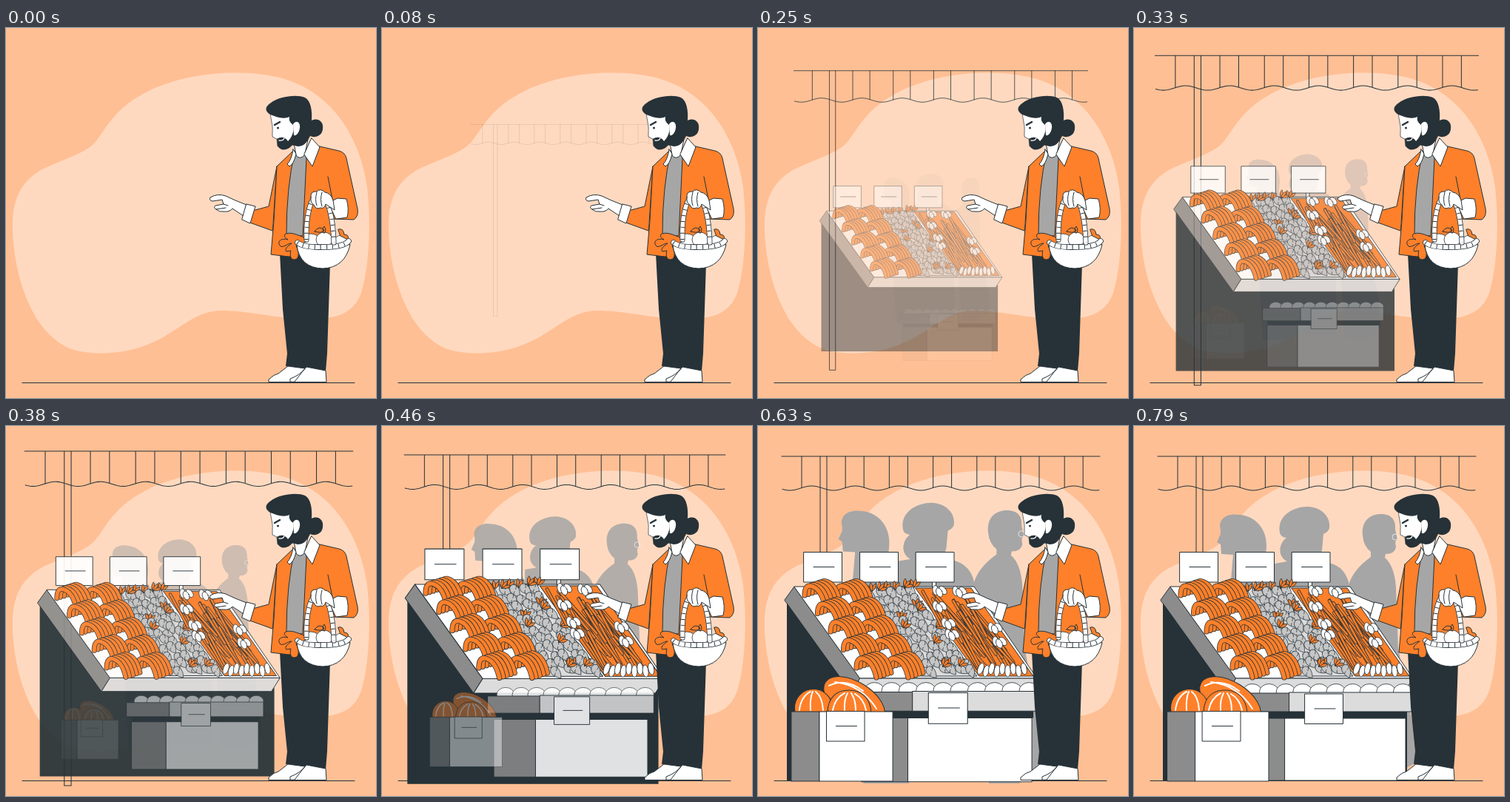
These frames come from a looping animation (500 px wide and 500 px high, 0.83 s). An HTML page:

```html
<!DOCTYPE html>
<html lang="en">
<head>
<meta charset="utf-8">
<title>Market stall</title>
<style>
html, body { margin: 0; width: 100%; height: 100%; overflow: hidden; background: #ffbf94; }
svg { display: block; width: 100vw; height: 100vh; }
.line { fill: none; stroke: #263238; }
.white { fill: #fff; stroke: #263238; }
.orange { fill: #ff802a; stroke: #263238; }
.pale { fill: #dcdcdc; stroke: #263238; }
.grey { fill: #8c8c8c; stroke: #263238; }
.dark { fill: #263238; }
.shade { fill: #a6a6a6; }
</style>
</head>
<body>
<svg viewBox="0 0 500 500" stroke-linejoin="round" stroke-linecap="round">
  <path fill="#ffd9bf" d="M9 270C8 235 18 205 55 188C85 175 108 168 120 155C136 136 145 108 195 84C250 58 330 54 380 70C440 90 478 145 488 215C494 270 490 325 480 358C468 392 435 394 400 393C355 391 325 381 288 382C255 383 235 408 200 424C165 441 120 443 92 435C30 415 9 320 9 270Z"/>
  <path class="line" d="M22 479.5H471"/>

  <g id="people" class="shade">
    <path d="M117 140C113 126 125 117 143 120C165 122 180 140 179 164L177 185L200 215L205 478H145L130 220L134 174L118 173L117 160L112 157L117 146Z"/>
    <path d="M197 144C193 122 214 109 235 109C255 110 266 124 264 138C262 144 257 145 256 146L254 168L250 183Q285 184 291 215V470H190V186L207 183C193 176 196 158 206 151Q198 150 197 144Z"/>
    <path d="M309 148C307 129 318 119 334 119C349 119 354 128 353 140L356 152L353 157L354 164Q352 173 340 173L339 178Q352 189 354 218L357 300L376 400L381 455L366 463L350 478H310L290 215Q296 194 320 177V170Q310 162 309 148Z"/>
    <circle cx="353" cy="150" r="4" fill="none" stroke="#fff" stroke-width=".7"/>
  </g>

  <g id="awning" class="line"></g>

  <g id="table">
    <path class="dark" d="M39 236L126 355H369V479.500H39Z"/>
    <path class="grey" d="M36 235L49 217L138 341L126 360Z"/>
    <path class="white" d="M49 217H292L377 341H138Z"/>
    <path class="pale" d="M138 341H377L365 360H126Z"/>
    <path class="pale" d="M143 219H206L296 338H221Z"/>
    <path class="orange" d="M213 219H288L372 338H299Z"/>
  </g>

  <g id="crate">
    <path class="grey" d="M143 395H204V479H143Z"/>
    <path class="white" d="M204 395H367V479H204Z"/>
    <path class="dark" d="M143 386H369V395H143Z"/>
  </g>

  <g id="pumpkins">
    <ellipse class="orange" cx="130" cy="371" rx="46" ry="25" transform="rotate(32 130 371)"/>
    <path fill="none" stroke="#fff" stroke-width="2" d="M96 351Q118 340 142 358M104 346Q140 350 160 382"/>
    <circle class="orange" cx="75" cy="381" r="25.500"/>
    <path class="orange" d="M94 388C94 367 106 357 123 357C140 357 152 368 153 388Z"/>
    <path fill="none" stroke="#fff" stroke-width="2" d="M56 384Q58 366 71 359M71 384Q70 368 74 359M88 384Q87 366 78 359M101 384Q104 368 117 361M117 384Q116 370 121 361M132 384Q132 370 126 361M146 384Q143 369 131 362"/>
    <path class="grey" d="M45 386H83V480H45Z"/>
    <path class="white" d="M83 386H182V480H83Z"/>
  </g>

  <g id="man">
    <path class="dark" d="M370 305L374 380L380 440L378 457L405 461L432 464L434 440L438 318L430 300Z"/>
    <path class="white" d="M355 478V475Q362 468 368 467L381 457L404 460L390 478ZM384 478V474Q398 469 406 458L432 463L433 478Z"/>
    <path class="orange" d="M366 187L355 241L333 247L327 262L360 274Z"/>
    <path class="orange" d="M387 167L366 187L362 260L358 306L382 309L440 300L442 258L470 259Q477 254 475 244L460 176Q458 168 450 166L424 160Z"/>
    <path d="M390 168Q379 215 379 279L401 281L406 176L402 166Z" fill="#a6a6a6" stroke="#263238"/>
    <path class="line" d="M435 201L442 236"/>
    <path class="white" d="M389 155L392 172Q397 179 404 171L408 150Z"/>
    <path class="white" d="M388 164L392 170Q389 184 383 187L380 184Q386 178 388 164ZM413 149L424 161L414 187L403 171Z"/>
    <path class="white" stroke-width=".7" d="M357 114C358 125 361 133 360 139L360 147L366 150L367 160L390 158L400 140L386 116Z"/>
    <path class="dark" d="M357 117C349 112 350 106 358 101C368 93 392 89 404 94C412 98 414 112 413 125C420 121 430 125 428 137C427 146 417 149 411 146C406 156 402 160 394 160L387 158C380 167 370 166 367 159L366 150C372 146 378 148 381 153C386 148 390 140 388 131C384 128 382 125 383 120C375 124 365 120 357 117Z"/>
    <path fill="#fff" d="M388 130C392 124 398 127 397 135C396 142 392 146 389 145Z"/>
    <path class="line" stroke-width="2.500" d="M363 131L370 127"/>
    <circle class="dark" cx="367.500" cy="135" r="1.500"/>
    <path fill="none" stroke="#fff" stroke-width="1.300" d="M369 152Q374 153 376 149"/>
    <path class="white" d="M325 239L310 233L297 227Q286 223 276 229Q274 233 279 234L292 232L294 238L283 240Q280 243 284 245Q288 249 294 248Q302 249 306 244L321 254Z"/>
    <path class="line" d="M294 238L300 240M284 245L297 243"/>
    <path class="white" d="M325 238L337 241L330 264L319 259Z"/>
    <g id="basket"></g>
  </g>
</svg>
<script>
const $ = id => document.getElementById(id);
const add = (id, markup) => $(id).insertAdjacentHTML("beforeend", markup);
const path = (cls, d, extra = "") => `<path class="${cls}" d="${d}" ${extra}/>`;
const oval = (cls, x, y, rx, ry, turn = 0) =>
  `<ellipse class="${cls}" rx="${rx}" ry="${ry}" stroke-width=".8" transform="translate(${x} ${y}) rotate(${turn})"/>`;
const rod = (d, width, color) =>
  path("", d, `fill="none" stroke="#263238" stroke-width="${width + 1.6}"`) +
  path("", d, `fill="none" stroke="${color}" stroke-width="${width}"`);
const label = (x, y) =>
  path("white", `M${x} ${y}h51.500v40.500h-51.500z`) + path("line", `M${x + 13} ${y + 20}h28`);

let seed = 7;
const rand = (lo, hi) => lo + (hi - lo) * ((seed = seed * 16807 % 2147483647) / 2147483647);

function drawAwning() {
  const wave = x => 84 + 3 * Math.cos((x - 102) / 59 * 2 * Math.PI);
  let d = "M32 41H462M84 41V479H93V41M33 " + wave(33);
  for (let x = 35; x <= 461; x += 2) d += `L${x} ${wave(x)}`;
  for (let x = 59; x < 440; x += 59.2) {
    d += `M${x} 41V${wave(x)}`;
    if (x > 60) d += `M${x + 25} 41V${wave(x + 25)}`;
  }
  add("awning", path("line", d));
}

function tuft(x, y, turn) {
  const leaf = a => path("orange", "M0 0Q-4 -7 0 -12Q4 -7 0 0Z",
    `stroke-width=".8" transform="translate(${x} ${y}) rotate(${turn + a})"`);
  return leaf(-35) + leaf(35) + leaf(0);
}

function drawProduce() {
  let out = "";
  for (const x of [62, 138, 213.5])
    out += path("white", `M${x + 22} 210v8h5v-8z`) + label(x, 170.5);

  // Roots in the middle tray
  for (let row = 0; row < 11; row++)
    for (let col = 0; col < 5; col++) {
      const x = 153 + row * 8.4 + col * 13 + rand(-3, 3), y = 224 + row * 10.6 + rand(-3, 3);
      const turn = rand(15, 60);
      if (row == 0 || rand(0, 1) < .17) out += tuft(x + 4, y - 3, rand(-30, 70));
      out += `<path d="M-8 0Q-7 -6 0 -5Q6 -4 11 2Q4 7 -3 6Q-8 4 -8 0ZM-3 -5q3 2 3 4M3 5q-2 -1 -2 -3" fill="#c6c6c6" stroke="#263238" stroke-width=".7" transform="translate(${x} ${y}) rotate(${turn})"/>`;
    }
  for (const [x, y] of [[163, 222], [198, 218], [216, 249], [238, 293], [250, 325], [272, 324]])
    out += tuft(x, y, 40);

  // Long stalks and white bulbs
  for (let i = 0; i < 42; i++) {
    const v = rand(0, .5), x = 222 + rand(0, 56) + 82 * v, y = 223 + 118 * v;
    const len = rand(40, 55);
    out += rod(`M${x} ${y}l${len * rand(.5, .95)} ${len}`, 2.6, "#ff802a");
  }
  const bulbs = [[245, 222], [272, 223], [245, 243], [257, 266], [262, 281], [320, 272], [326, 291]];
  for (const [x, y] of bulbs)
    for (const dx of [-5, 5, 0])
      out += oval("white", x + dx, y + (dx ? 0 : 3), 4, 6.5, -25 - dx * 3);
  for (let i = 0; i < 9; i++) out += oval("white", 301 + i * 7.3, 328 + i % 2 * 3, 3.8, 8, 20 - i * 4);

  // Bunches in the left tray
  for (let row = 0; row < 5; row++)
    for (const col of [1, 0])
      for (let i = 4; i >= 0; i--) {
        const x = 63 + row * 17.5 + col * 43 + i * 5, y = 219 + row * 24.5 - i * 1.6;
        out += rod(`M${x} ${y + 10}q0 -14 8 -13q14 3 19 26`, 5.4, "#ff802a");
      }
  add("table", out);
}

function drawCrates() {
  let out = "";
  for (let i = 0; i < 10; i++) out += oval("white", 160 + i * 22.6, 359, 13, 10.5);
  out += path("grey", "M134 361H210V386H134Z") + path("pale", "M210 360H376V386H210Z") + label(231, 362);
  add("crate", out);
  add("pumpkins", label(92.5, 385.5));
}

function drawBasket() {
  const handle = "M406 286C405 255 411 227 423 226C436 227 442 258 443 290";
  const rim = "M394 290Q402 297 430 296Q456 296 463 288";
  const rope = (d, w) => rod(d, w, "#fff") +
    path("line", d, `stroke-width="${w}" stroke-dasharray="1 7" stroke-linecap="butt"`);
  add("basket",
    oval("white", 412, 287, 12, 9) + oval("white", 430, 286, 11, 10) + oval("white", 453, 288, 9, 8) +
    path("orange", "M417 275Q423 266 430 273Q428 278 417 275ZM430 277Q426 272 430 268Q434 274 430 277ZM449 272Q456 270 457 279Q464 279 462 286L452 281Z") +
    path("orange", "M406 284C398 282 388 275 378 278C374 281 378 284 381 286C370 283 366 290 371 295C376 297 382 290 386 291C380 295 376 299 379 302L385 301C383 309 385 313 390 313C397 312 396 303 392 294L406 289Z") +
    path("white", "M393 294Q397 324 428 325Q458 324 465 293Z") +
    rope(rim, 6) + rope(handle, 5.5) +
    path("white", "M436 236L448 230L460 231Q464 244 461 256L446 258Z") +
    path("white", "M412 229Q411 220 420 221Q425 216 431 222Q439 223 442 233L444 246L432 238Q430 245 425 243Q419 246 416 239Q411 236 412 229Z") +
    path("line", "M420 222Q417 232 420 240M427 222Q424 232 427 241"));
}

drawAwning();
drawProduce();
drawCrates();
drawBasket();

// Overshooting ease: cubic-bezier(.36, -.01, .5, 1.38)
const curve = (a, b, u) => 3 * a * u * (1 - u) ** 2 + 3 * b * u * u * (1 - u) + u ** 3;
function ease(x) {
  if (x <= 0) return 0;
  if (x >= 1) return 1;
  let lo = 0, hi = 1;
  for (let i = 0; i < 24; i++) {
    const mid = (lo + hi) / 2;
    if (curve(.36, .5, mid) < x) lo = mid; else hi = mid;
  }
  return curve(-.01, 1.38, lo);
}

const LOOP = 830, STEP = 41.5, LENGTH = 12;
// Group, start step, zoom centre
const zooms = [
  ["awning", -.7, 247, 260],
  ["table", 1.7, 207, 326],
  ["people", 4.2, 235, 300],
  ["crate", 4.25, 257, 415],
  ["pumpkins", 6.8, 113.5, 412]
];

function draw(now) {
  const step = Math.floor((now % LOOP + 4.5) / STEP);
  for (const [id, start, x, y] of zooms) {
    const p = step ? ease((step - start) / LENGTH) : 0, s = .5 + p / 2;
    $(id).setAttribute("transform", `translate(${x} ${y}) scale(${s}) translate(${-x} ${-y})`);
    $(id).setAttribute("opacity", Math.max(0, Math.min(1, p)));
  }
}

const begin = performance.now();
function tick() {
  draw(performance.now() - begin);
  requestAnimationFrame(tick);
}
tick();
</script>
</body>
</html>
```
